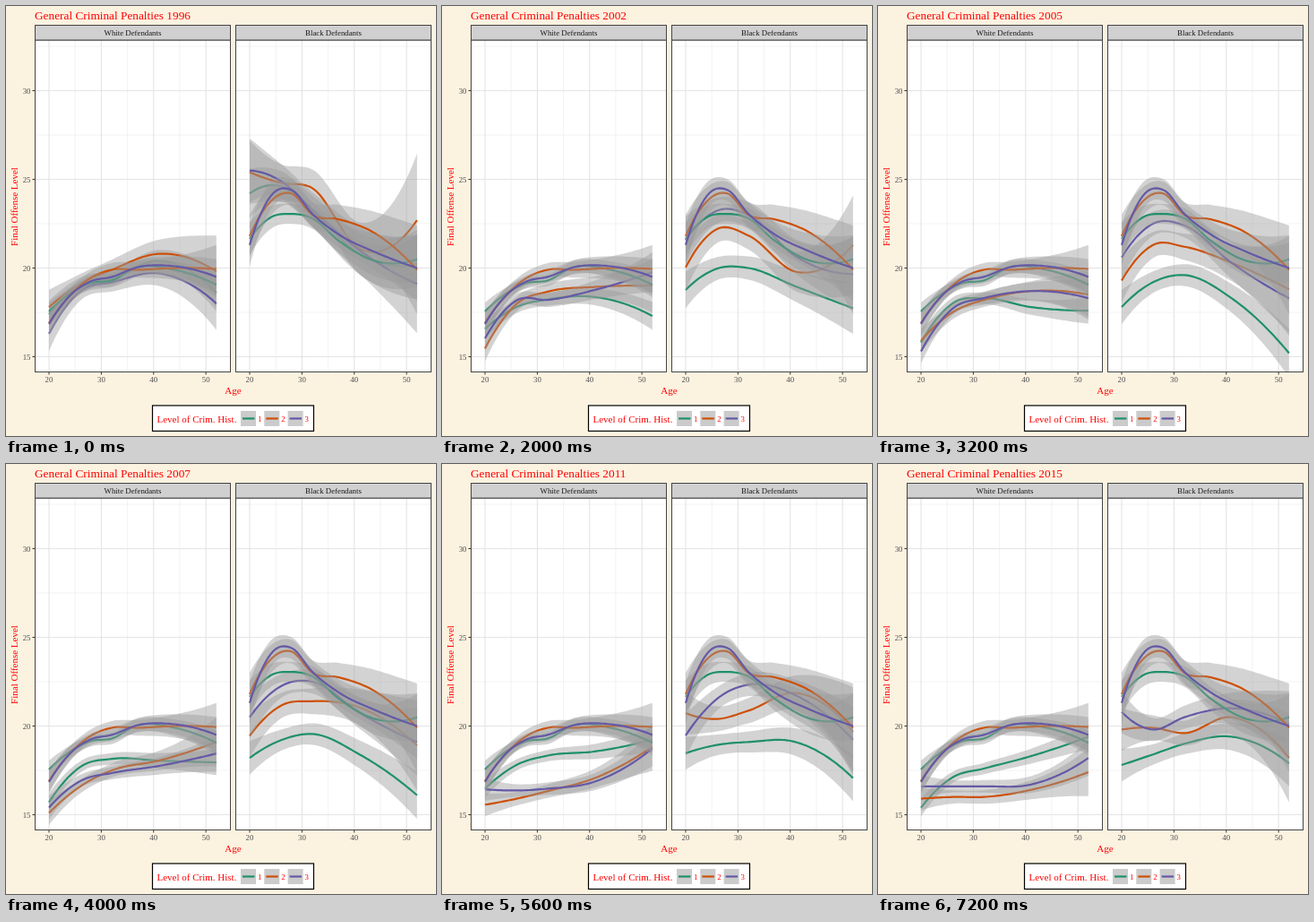
These frames come from a looping animation (480x480 px, 7600 ms). An HTML page with a canvas:

```html
<!DOCTYPE html>
<html lang="en">
<head>
<meta charset="utf-8">
<title>Sentence levels by age</title>
<style>
html, body { margin: 0; width: 100%; height: 100%; overflow: hidden; background: #fcf2e0; }
canvas { display: block; }
</style>
</head>
<body>
<canvas id="stage" width="480" height="480"></canvas>
<script>
const ctx = document.getElementById('stage').getContext('2d');
const FONT = '"Liberation Serif", "Times New Roman", serif';
const COLORS = ['#1f906c', '#cd5009', '#6459a6'];
const RED = '#f00', DARK = '#444', LABEL = '#4d4d4d';
const TOP = 38, BOTTOM = 408.5, WIDTH = 218;
const STEP = 400, STEPS = 19;
const MIN_AGE = 20, MAX_AGE = 52;

const ageX = age => 15.5 + (age - MIN_AGE) * 5.838;
const levelY = level => 391.5 - (level - 15) * 19.8;
const mix = (a, b, u) => a + (b - a) * u;
const range = (from, to, by) =>
  Array.from({ length: Math.floor((to - from) / by) + 1 }, (_, i) => from + i * by);

// Offense levels at a few ages; one curve for each criminal history group.
const ALL_AGES = [20, 24, 28, 32, 37, 44, 52];
const YEAR_AGES = [20, 26, 32, 41, 52];

const panels = [
  {
    x: 32.5, name: 'White Defendants', spread: 1,
    all: [
      [17.55, 18.55, 19.15, 19.3, 20.05, 19.9, 19.05],
      [16.9, 18.45, 19.45, 19.9, 19.9, 20, 19.95],
      [16.85, 18.45, 19.25, 19.5, 20.05, 20.1, 19.5]
    ],
    years: {
      0: [[17.4, 19, 19.4, 20.4, 18.6], [17.8, 19.1, 19.9, 20.8, 19.8], [16.3, 18.7, 19.2, 19.7, 18]],
      3: [[18.1, 19.2, 19.7, 19.9, 19.1], [17.2, 19.1, 20, 19.8, 21.4], [17.3, 19.1, 18.8, 19.7, 19.5]],
      6: [[15.8, 17.1, 17.5, 17.6, 16.4], [14.6, 17.4, 18, 18.5, 17.8], [15.4, 17.7, 17.9, 18.3, 19.9]],
      8: [[15.8, 18, 18.3, 17.8, 17.6], [15.9, 17.5, 18.2, 18.7, 18.5], [15.3, 17.7, 18.3, 18.7, 18.3]],
      12: [[15.6, 17.4, 18, 18.3, 18.3], [14.3, 15.7, 16.8, 17.4, 19.7], [15.5, 16.1, 16.4, 16.8, 18.6]],
      15: [[16.9, 18, 18.5, 18.7, 19.7], [16.2, 16, 16.1, 16.9, 18.4], [16.9, 16.5, 16.5, 16.9, 18.8]],
      18: [[15.4, 17.1, 17.6, 18.3, 19.4], [15.9, 16, 16, 16.4, 17.4], [16.6, 16.6, 16.6, 16.7, 18.2]]
    }
  }, {
    x: 256.5, name: 'Black Defendants', spread: 1.85,
    all: [
      [21.65, 22.85, 23.05, 22.8, 21.55, 20.4, 20.5],
      [21.8, 23.75, 24.2, 23, 22.75, 21.95, 19.9],
      [21.3, 24.05, 24.4, 23.05, 21.9, 20.9, 20]
    ],
    years: {
      0: [[24.2, 24.6, 23.2, 20.8, 20.2], [25.4, 24.8, 24.5, 21.1, 22.7], [25.5, 24.9, 23.3, 21, 19.1]],
      3: [[21.9, 22.9, 22.2, 20.9, 20.4], [22.9, 24.6, 23.7, 21.4, 25.5], [22.9, 24.5, 23.8, 21.6, 20.8]],
      6: [[17.2, 18.5, 18.9, 18, 16.4], [18.6, 21, 20.9, 19, 19.2], [20.9, 22.6, 22.6, 20.2, 19.1]],
      8: [[17.8, 19.2, 19.6, 18.3, 15.2], [19.3, 21.3, 21.2, 20.3, 18.8], [20.6, 22.5, 22.4, 20.3, 18.3]],
      12: [[18.6, 19.2, 19.5, 18.5, 17], [19.6, 21, 21.6, 21.8, 19], [20.4, 22, 22.6, 21.2, 19.9]],
      15: [[18.4, 18.8, 18.9, 19.4, 17.1], [21.3, 20.1, 20.5, 21.9, 20], [19, 21.3, 22.2, 22, 18.9]],
      18: [[17.8, 18.4, 19, 19.4, 17.9], [19.8, 19.9, 19.6, 20.5, 18.2], [20.8, 19.8, 20.5, 21, 20.1]]
    }
  }
];

// Half width of a group's band at the youngest, middle and oldest ages.
const BANDS = [[0.5, 0.3, 0.7], [0.65, 0.36, 1.35], [0.65, 0.33, 1]];

function bandAt(group, age) {
  const [young, middle, old] = BANDS[group];
  const base = middle * (1 + 0.03 * Math.max(0, age - 30));
  const start = Math.max(0, (28 - age) / 8) ** 2;
  const end = Math.max(0, (age - 34) / 18) ** 3;
  return mix(mix(base, young, start), old, end);
}

function yearCurve(years, step, group) {
  const steps = Object.keys(years).map(Number);
  const next = Math.max(1, steps.findIndex(s => s >= step));
  const a = steps[next - 1], b = steps[next];
  return years[a][group].map((v, i) => mix(v, years[b][group][i], (step - a) / (b - a)));
}

// Smooth function through the points, with parabolic slopes at each one.
function spline(xs, ys) {
  const n = xs.length;
  const chord = i => (ys[i + 1] - ys[i]) / (xs[i + 1] - xs[i]);
  const slope = xs.map((x, i) => {
    const j = Math.min(Math.max(i, 1), n - 2);
    const l = chord(j - 1), r = chord(j);
    const bend = (r - l) / (xs[j + 1] - xs[j - 1]);
    return l + bend * (2 * x - xs[j] - xs[j - 1]);
  });
  return x => {
    let i = 0;
    while (i < n - 2 && x > xs[i + 1]) i++;
    const h = xs[i + 1] - xs[i], u = (x - xs[i]) / h, v = 1 - u;
    return v * v * ((1 + 2 * u) * ys[i] + u * h * slope[i])
      + u * u * ((1 + 2 * v) * ys[i + 1] - v * h * slope[i + 1]);
  };
}

function drawCurve(x0, group, levelAt, scale) {
  const ages = range(MIN_AGE, MAX_AGE, 0.5);
  const edge = side => ages.map(a =>
    [x0 + ageX(a), levelY(levelAt(a) + side * scale * bandAt(group, a))]);
  const path = points => {
    ctx.beginPath();
    points.forEach(p => ctx.lineTo(...p));
  };
  path([...edge(1), ...edge(-1).reverse()]);
  ctx.fillStyle = 'rgba(153,153,153,0.43)';
  ctx.fill();
  path(edge(0));
  ctx.strokeStyle = COLORS[group];
  ctx.lineWidth = 2.2;
  ctx.stroke();
}

function text(str, x, y, size, color, align = 'left') {
  ctx.font = `${size}px ${FONT}`;
  ctx.fillStyle = color;
  ctx.textAlign = align;
  ctx.fillText(str, x, y);
}

function segment(x1, y1, x2, y2, color, width = 1) {
  ctx.beginPath();
  ctx.moveTo(x1, y1);
  ctx.lineTo(x2, y2);
  ctx.strokeStyle = color;
  ctx.lineWidth = width;
  ctx.stroke();
}

function box(x, y, w, h, fill, stroke, width = 1) {
  ctx.fillStyle = fill;
  ctx.fillRect(x, y, w, h);
  ctx.strokeStyle = stroke;
  ctx.lineWidth = width;
  ctx.strokeRect(x, y, w, h);
}

function drawGrid(x0) {
  const lines = (ages, levels, color, width) => {
    levels.forEach(v => segment(x0, levelY(v), x0 + WIDTH, levelY(v), color, width));
    ages.forEach(a => segment(x0 + ageX(a), TOP, x0 + ageX(a), BOTTOM, color, width));
  };
  lines(range(25, 45, 10), range(17.5, 32.5, 5), '#ebebeb', 0.6);
  lines(range(20, 50, 10), range(15, 30, 5), '#e4e4e4', 1.1);
}

function drawPanel({ x, name, spread, all, years }, step) {
  const early = 1 + 0.5 * 0.75 ** step;
  ctx.save();
  ctx.beginPath();
  ctx.rect(x, TOP, WIDTH, BOTTOM - TOP);
  ctx.clip();
  ctx.fillStyle = '#fff';
  ctx.fillRect(x, TOP, WIDTH, BOTTOM - TOP);
  drawGrid(x);
  COLORS.forEach((_, g) => drawCurve(x, g, spline(YEAR_AGES, yearCurve(years, step, g)), spread * early));
  COLORS.forEach((_, g) => drawCurve(x, g, spline(ALL_AGES, all[g]), spread));
  ctx.restore();

  box(x, TOP, WIDTH, BOTTOM - TOP, 'transparent', DARK);
  box(x, 21.5, WIDTH, TOP - 21.5, '#d0d0d0', DARK);
  text(name, x + WIDTH / 2, 33, 8.8, '#1a1a1a', 'center');
  for (const age of range(20, 50, 10)) {
    const tx = x + ageX(age);
    segment(tx, 409, tx, 411.5, '#333');
    text(age, tx, 420, 8.8, LABEL, 'center');
  }
}

function drawLegend() {
  box(163.5, 446, 180, 28.5, '#fff', '#000', 1.2);
  text('Level of Crim. Hist.', 168.5, 464.5, 11, RED);
  COLORS.forEach((color, i) => {
    const x = 262 + i * 26.3;
    ctx.fillStyle = '#cbcbcb';
    ctx.fillRect(x, 452, 17, 17);
    segment(x + 2, 460.5, x + 15.5, 460.5, color, 2.2);
    text(i + 1, x + 19, 464, 8.8, RED);
  });
}

// The series has one year missing after 2000.
const yearAt = step => 1996 + step + (step > 4 ? 1 : 0);

function draw(now) {
  const step = Math.floor(now / STEP) % STEPS;
  ctx.fillStyle = '#fcf2e0';
  ctx.fillRect(0, 0, 480, 480);
  text('General Criminal Penalties ' + yearAt(step), 32, 15, 13.3, RED);
  panels.forEach(p => drawPanel(p, step));
  for (const level of range(15, 30, 5)) {
    segment(29.5, levelY(level), 32, levelY(level), '#333');
    text(level, 27.5, levelY(level) + 3, 8.8, LABEL, 'right');
  }
  text('Age', 253.5, 433, 11, RED, 'center');
  ctx.save();
  ctx.translate(13, 224);
  ctx.rotate(-Math.PI / 2);
  text('Final Offense Level', 0, 0, 11, RED, 'center');
  ctx.restore();
  drawLegend();
  requestAnimationFrame(draw);
}
requestAnimationFrame(draw);
</script>
</body>
</html>
```
